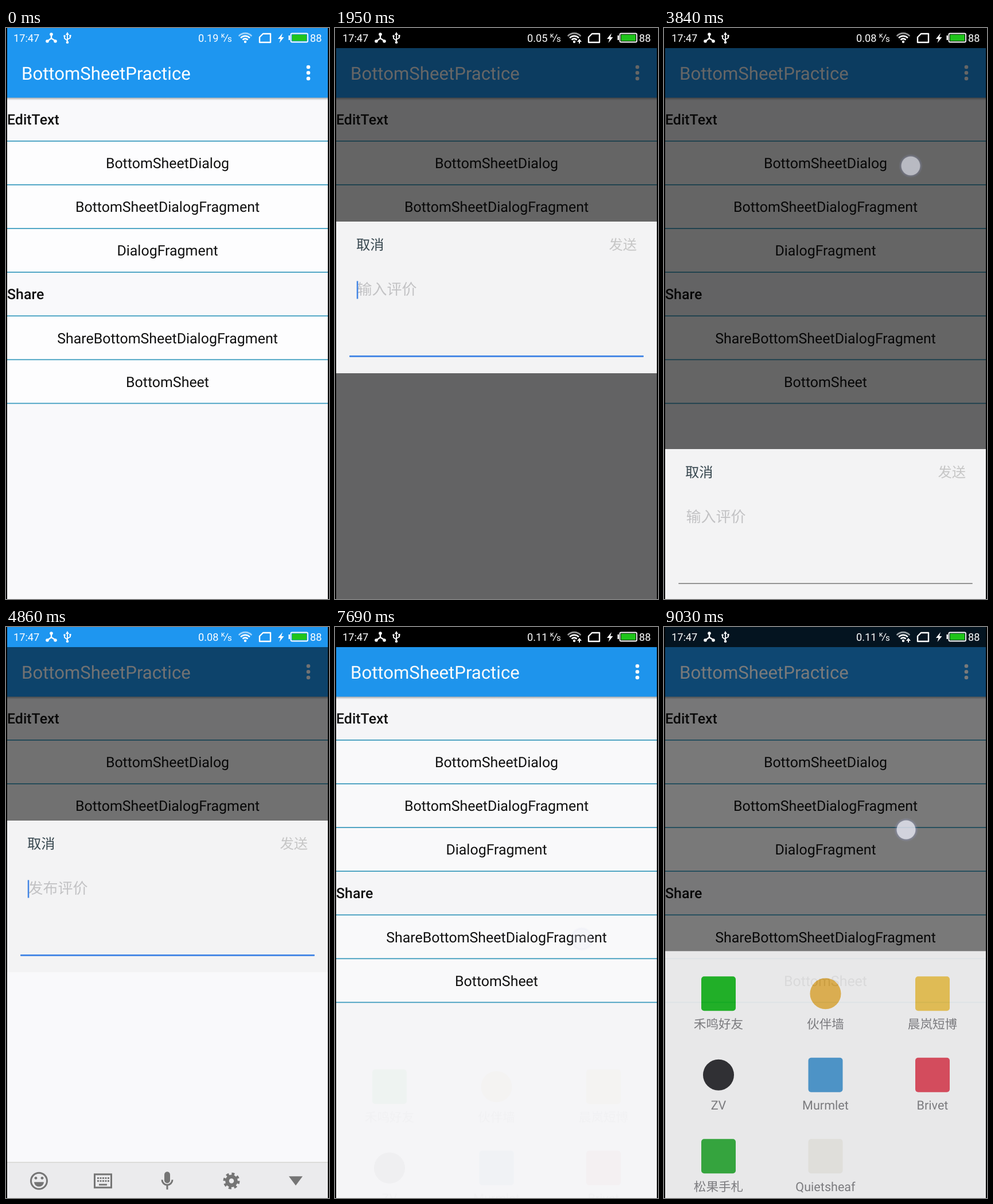
Write an HTML page that moves like this. It is 563 px wide and 994 px high and loops after 9070 ms.

```html
<!DOCTYPE html>
<html lang="zh">
<head>
<meta charset="utf-8">
<style>
  html, body { margin: 0; height: 100%; overflow: hidden; background: #000; }
  svg {
    display: block; width: 100vw; height: 100vh; text-rendering: geometricPrecision;
    font-family: Roboto, 'Noto Sans CJK SC', 'Noto Sans CJK', sans-serif;
  }
</style>
</head>
<body>
<svg id="stage" viewBox="0 0 563 994"></svg>
<script>
const LOOP = 9070;
const $ = id => document.getElementById(id);

const text = (x, y, s, size, fill, anchor = 'start', extra = '') =>
  `<text x="${x}" y="${y}" font-size="${size}" fill="${fill}" text-anchor="${anchor}" ${extra}>${s}</text>`;
const rect = (x, y, w, h, fill, extra = '') =>
  `<rect x="${x}" y="${y}" width="${w}" height="${h}" fill="${fill}" ${extra}/>`;
const line = (d, color, w, extra = '') =>
  `<path d="${d}" fill="none" stroke="${color}" stroke-width="${w}" ${extra}/>`;
const shape = (d, fill, extra = '') => `<path d="${d}" fill="${fill}" ${extra}/>`;
const dot = (x, y, r, fill, extra = '') => `<circle cx="${x}" cy="${y}" r="${r}" fill="${fill}" ${extra}/>`;

function statusBar() {
  const w = '#fff';
  const arc = r => line(`M${417 - r * .75} ${25 - r * .72}A${r} ${r} 0 0 1 ${417 + r * .75} ${25 - r * .72}`, w, 2.6,
    r > 14 ? 'opacity=".6"' : '');
  return rect(0, 0, 563, 35, '#1e96f0') + rect(0, 0, 563, 35, '#000', 'id="black"') +
    text(13, 24, '17:47', 18.2, w) +
    line('M79 12V18L72 23M79 18L87 23', w, 2.4) + dot(79, 11, 2.8, w) + dot(72, 23, 2.8, w) + dot(86, 23, 2.8, w) +
    line('M107 10V26M102 14V18L107 22M112 13V17L107 20', w, 1.8) +
    shape('M107 7l3 5h-6z', w) + dot(107, 25, 2.3, w) + dot(102, 14, 1.8, w) + rect(110.5, 12, 3, 3, w) +
    text(335, 24, '', 18.2, w, 'start', 'id="speed"') +
    text(375, 17, 'K', 10, w, 'start', 'font-weight="500"') + line('M380 24L387 11', w, 1.3) + text(386, 24, 's', 15, w) +
    [6, 10.5, 15].map(arc).join('') + dot(417, 24, 2.2, w) +
    shape('', w, 'id="arrow"') +
    line('M448 10H461V25H442V16Z', w, 2.4, 'stroke-linejoin="round"') +
    shape('M482 9l-8 10h4.5l-2 7 8-10h-4.5z', w) +
    rect(496.5, 9.5, 29.5, 15, 'none', 'rx="2" stroke="#fff" stroke-width="1.8"') +
    rect(498.5, 11.5, 25.5, 11, '#1fc41a') + rect(492.5, 13, 2.5, 8, w) +
    text(530, 24, '88', 18.2, w);
}

function activity() {
  const rowY = i => 196 + i * 76.1;
  const button = (i, s) => rect(0, rowY(i), 563, 76.1, '#fdfdfe') +
    text(281.5, rowY(i) + 48.2, s, 24.93, '#111', 'middle');
  const rule = i => rect(0, rowY(i), 563, 1.7, '#3699bd');
  return rect(0, 35, 563, 959, '#f9f9fb') +
    rect(0, 121, 563, 5, 'url(#shade)') + rect(0, 34, 563, 87.3, '#1e96f0') +
    text(27, 90, 'BottomSheetPractice', 31.17, '#fff') +
    [68, 78, 88].map(y => dot(527, y, 3.3, '#fff')).join('') +
    `<g clip-path="url(#short)">` +
    text(2, 168, 'EditText', 24.93, '#111', 'start', 'font-weight="500"') +
    text(2, 472.3, 'Share', 24.93, '#111', 'start', 'font-weight="500"') +
    button(0, 'BottomSheetDialog') + button(1, 'BottomSheetDialogFragment') + button(2, 'DialogFragment') +
    button(4, 'ShareBottomSheetDialogFragment') + button(5, 'BottomSheet') +
    [0, 1, 2, 3, 4, 5, 6].map(rule).join('') + '</g>';
}

function editSheet() {
  return rect(0, 337, 563, 264, '#f3f3f4') +
    text(37, 386, '取消', 24.3, '#37474f') + text(526, 386, '发送', 24.3, '#c6c6c6', 'end') +
    text(38.5, 464, '', 26, '#c2c2c4', 'start', 'id="hint"') +
    rect(37.8, 440.5, 2.5, 31, '#4285e4', 'id="cursor"') +
    rect(25, 570, 513, 3, '#4a8ae6', 'rx="1" id="underline"');
}

// Share targets: [label, colour, round mark?]
const targets = [
  ['禾鸣好友', '#14b81c'], ['伙伴墙', '#e9b64b', 1], ['晨岚短博', '#efc650'],
  ['ZV', '#26262a', 1], ['Murmlet', '#4798d2'], ['Brivet', '#e2465a'],
  ['松果手札', '#2cab36'], ['Quietsheaf', '#efeeea']
];
function shareSheet() {
  return rect(0, 539, 563, 660, '#fafafb') + targets.map(([label, color, round], i) => {
    const x = 95 + i % 3 * 186.5, y = 613 + Math.floor(i / 3) * 141.5;
    return (round ? dot(x, y, 27, color) : rect(x - 30, y - 30, 60, 60, color, 'rx="5"')) +
      text(x, y + 60.5, label, 21.6, '#7c7c80', 'middle');
  }).join('');
}

function keyboard() {
  const g = '#757575', ink = '#333';
  const key = (x, y, w) => rect(x, y, w, 68, '#fdfdfd', 'rx="6" stroke="#dcdcd8" stroke-width="1.3"');
  const row = (x, y, letters, marks) => [...letters].map((c, i) => {
    const left = x + i * 54.85, mid = left + 23;
    return key(left, y, 46.5) + text(mid, y + 39.5, c, 29.5, ink, 'middle') +
      text(mid, y + 58.5, marks[i], 17, '#bcbcbc', 'middle');
  }).join('');
  const mic = (x, y, k, fill) => `<g transform="translate(${x} ${y}) scale(${k})">` +
    rect(-5, -16, 10, 20, fill, 'rx="5"') + line('M-9 -2a9 9 0 0 0 18 0M0 7V15', fill, 3) + '</g>';
  return rect(0, 640, 563, 360, '#ebebed') + rect(0, 640, 563, 1.3, '#d3d3cf') +
    dot(57.5, 673, 14, 'none', `stroke="${g}" stroke-width="3"`) + dot(52, 668, 2.4, g) + dot(63, 668, 2.4, g) +
    shape('M49 675h17a8.5 8 0 0 1-17 0z', g) +
    rect(154.5, 661.5, 29, 23, 'none', `stroke="${g}" stroke-width="3"`) +
    line('M159 668H180M159 673H180', g, 2.8, 'stroke-dasharray="3 1.5"') + line('M162 679.5H176', g, 2.8) +
    mic(281, 673, 1, g) +
    dot(393, 673, 7.5, 'none', `stroke="${g}" stroke-width="6.5"`) +
    dot(393, 673, 12, 'none', `stroke="${g}" stroke-width="5" stroke-dasharray="4.712"`) +
    shape('M493 665h24l-12 16z', g) +
    row(11.5, 709, 'qwertyuiop', '1234567890') +
    row(38.9, 791.5, 'asdfghjkl', '…@!#~%?()') +
    row(93.8, 874, 'zxcvbnm', '-_:;、./') +
    key(11.5, 874, 73.5) + shape('M48 896l12.5 13h-7v11h-11v-11h-7z', g) +
    key(478, 874, 73.5) + shape('M497 908l10-12h21v24h-21z', g) + line('M512 903l10 10M522 903l-10 10', '#fff', 2.8) +
    [[11.5, 73.5], [93.5, 57.5], [159.5, 46], [214, 136], [358, 46], [412.5, 57], [478, 73.5]]
      .map(([x, w]) => key(x, 956, w)).join('') +
    text(48, 998, '符', 24, '#666', 'middle') + text(122, 998, '123', 22, '#666', 'middle') +
    text(182, 992, ',', 30, ink, 'middle', 'font-weight="500"') +
    text(281.5, 997, '拼音', 23.5, ink, 'middle', 'id="pinyin"') +
    `<g id="spaceMic">${mic(281, 983, .62, '#b8b8b8')}</g>` +
    dot(380, 993, 3.5, 'none', `stroke="${ink}" stroke-width="2"`) +
    text(431, 989, '中', 22, '#555', 'middle') + text(443, 996, '/', 15, '#bbb') +
    line('M528 982V991H505', g, 3.5) + shape('M497 991l11-8v16z', g);
}

$('stage').innerHTML = `
  <defs>
    <linearGradient id="shade" x2="0" y2="1"><stop stop-color="#aaa"/><stop offset="1" stop-color="#f9f9fb"/></linearGradient>
    <radialGradient id="halo"><stop offset=".7" stop-color="#9aa4dc" stop-opacity=".45"/><stop offset="1" stop-color="#9aa4dc" stop-opacity="0"/></radialGradient>
    <clipPath id="short"><rect id="clip" width="563" height="994"/></clipPath>
  </defs>
  ${activity()}
  ${rect(0, 35, 563, 959, '#000', 'id="dim"')}
  <g id="edit">${editSheet()}</g>
  <g id="share">${shareSheet()}</g>
  <g id="keys">${keyboard()}</g>
  ${statusBar()}
  <g id="touch">${dot(0, 0, 21, 'url(#halo)')}${dot(0, 0, 16.5, '#fff', 'fill-opacity=".62"')}</g>
  ${rect(0, 0, 2, 994, '#000')}${rect(561, 0, 2, 994, '#000')}`;

const part = (t, start, length) => Math.min(1, Math.max(0, (t - start) / length));
const smooth = p => (1 - Math.cos(Math.PI * p)) / 2;
const within = (t, a, b) => t >= a && t < b;
const show = (id, on) => $(id).setAttribute('visibility', on ? 'visible' : 'hidden');
const set = (id, attrs) => { for (const k in attrs) $(id).setAttribute(k, attrs[k]); };
// Visibility of a window that enters from a to b and leaves from c to d.
const presence = (t, a, b, c, d) => smooth(part(t, a, b - a)) * (1 - smooth(part(t, c, d - c)));

// Taps: [x, y, down, gone]
const taps = [
  [430, 238, 1390, 1680], [430, 240, 3710, 3960], [430, 390, 4400, 4690],
  [446, 238, 5980, 6450], [430, 543, 7460, 7740], [422, 353, 8850, 9250]
];

function draw(t) {
  const first = presence(t, 1680, 1880, 3900, 4080);
  const second = presence(t, 4680, 4840, 6130, 6300);
  const secondDim = presence(t, 4680, 4900, 6130, 6300);
  const share = presence(t, 7670, 7870, 8991, 9156);
  const inFirst = t < 4200;

  // Bottom sheets blacken the status bar at once and let it fade back on leaving.
  set('black', { opacity: within(t, 1680, 1880) || within(t, 7670, 7870) ? 1 : first + share });
  $('speed').textContent = t < 50 ? '0.19' : t < 3100 ? '0.05' : t < 6150 ? '0.08' : '0.11';
  const up = within(t, 970, 3710) || t >= 6950, down = within(t, 5980, 6950);
  set('arrow', { d: up ? 'M426 19l4 5h-3v3h-2v-3h-3z' : down ? 'M426 27l4-5h-3v-3h-2v3h-3z' : 'M0 0' });

  // The list is cut short while the keyboard resizes the window.
  const resizing = within(t, 1680, 2320) || within(t, 4830, 5230);
  set('clip', { height: resizing ? 601 : 994 });
  set('dim', { opacity: .6 * (first + secondDim + share), height: within(t, 4830, 5230) ? 566 : 959 });

  // Text sheet
  const drop = (inFirst ? 192 * (1 - first) : 0) + (within(t, 3190, 4200) ? 396 : 0);
  set('edit', { opacity: first + second, transform: `translate(0 ${drop})` });
  $('hint').textContent = inFirst ? '输入评价' : '发布评价';
  const focused = inFirst ? t < 3010 : t < 6100;
  set('underline', focused ? { y: 570, height: 3, fill: '#4a8ae6' } : { y: 570.3, height: 1.5, fill: '#777' });
  show('cursor', focused && !within(t, 2320, 2780) && !within(t, 5060, 5560));

  set('share', { opacity: share, transform: `translate(0 ${192 * (1 - share)})` });

  // Keyboard
  const rise = inFirst ? part(t, 1960, 300) : part(t, 4831, 300);
  const fall = inFirst ? part(t, 3150, 190) : part(t, 6350, 180);
  const hidden = Math.max((1 - rise) ** 2, fall ** 1.5);
  set('keys', { transform: `translate(0 ${357 * hidden})` });
  show('keys', hidden < 1);
  const named = t < 5980;
  set('pinyin', { opacity: +named });
  set('spaceMic', { opacity: +!named });

  const tap = taps.find(([, , a, b]) => within(t, a, b));
  show('touch', tap);
  if (tap) {
    const [x, y, a, b] = tap;
    set('touch', { transform: `translate(${x} ${y})`, opacity: Math.min(part(t, a - 30, 80), 1 - part(t, b - 150, 150)) });
  }
}

let begin;
function tick(now) {
  begin ??= now;
  draw((now - begin) % LOOP);
  requestAnimationFrame(tick);
}
draw(0);
requestAnimationFrame(tick);
</script>
</body>
</html>
```
